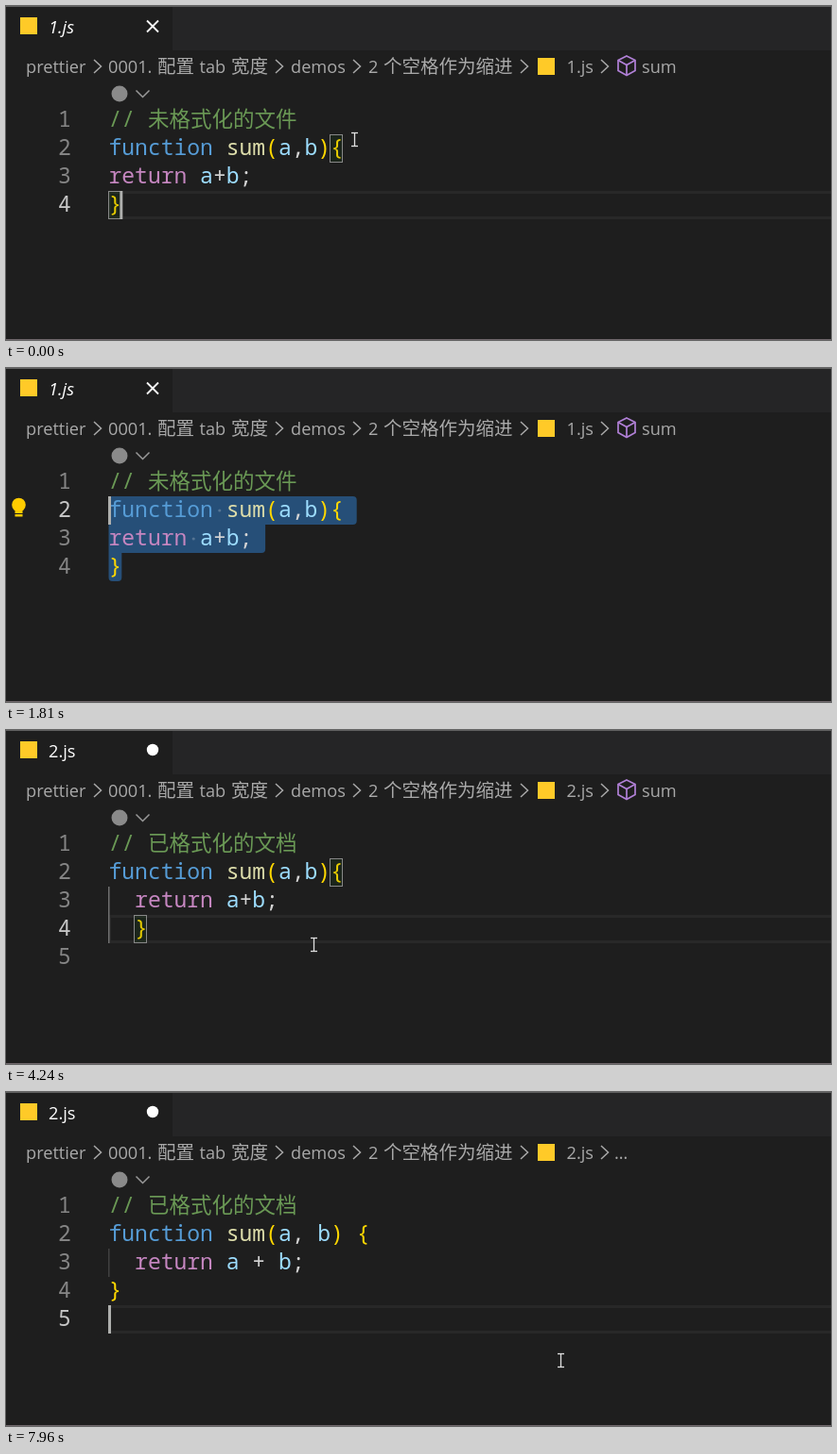
An HTML page with a canvas that plays this animation: 872x354 px, repeating every 8000 ms.

```html
<!DOCTYPE html>
<html lang="zh-CN">
<head>
<meta charset="utf-8">
<title>Tab width</title>
<style>
  html, body { margin: 0; width: 100%; height: 100%; overflow: hidden; background: #1e1e1e; }
  canvas { display: block; }
</style>
</head>
<body>
<canvas id="stage" width="872" height="354"></canvas>
<script>
const ctx = document.getElementById('stage').getContext('2d');
const LOOP = 8000, LEFT = 108.5, CHAR = 13.8, ROW = 30;
const CJK = '"Noto Sans CJK SC", "Noto Sans CJK"';
const CODE = `23px "Noto Sans Mono", ${CJK}, monospace`;
const UI = `18.2px "Open Sans", "Noto Sans", ${CJK}, sans-serif`;
const HAN = `19.5px ${CJK}, sans-serif`;

const note = '// 已格式化的文档', head = 'function sum(a,b){';
const messy = ['// 未格式化的文件', head, 'return a+b;', '}'];
const tidy = [note, 'function sum(a, b) {', '  return a + b;', '}', ''];
const pasted = [note, head, '  return a+b;', '  }', ''];
const outdented = [note, head, 'return a+b;', '}', ''];

// Each entry changes part of the editor state; at/from are [line, column].
const changes = [
  [0, { file: 1, lines: messy, at: [4, 1], from: null, caret: 1, crumb: 'sum' }],
  [685, { from: [4, 1], at: [3, 3] }],
  [825, { at: [2, 1] }],
  [970, { at: [2, 0] }],
  [1110, { bulb: [13.5, 147] }],
  [2055, { blur: true, caret: 0 }],
  [2315, { file: 2, lines: [], from: null, bulb: null, crumb: '' }],
  [2450, { lines: tidy, at: [1, 0], crumb: '…' }],
  [2880, { at: [4, 1], blur: false, caret: 1, crumb: 'sum' }],
  [3020, { from: [4, 1], at: [3, 5] }],
  [3160, { at: [2, 0] }],
  [3425, { bulb: [121, 177] }],
  [3695, { lines: pasted, from: null, at: [4, 3], bulb: null, dirty: true }],
  [4235, { caret: 0 }],
  [4795, { caret: 1 }],
  [4925, { from: [4, 3], at: [3, 9] }],
  [5060, { at: [3, 1] }],
  [5455, { bulb: [121, 207] }],
  [5735, { caret: 0.5 }],
  [5855, { caret: 0 }],
  [6135, { lines: outdented, from: [4, 1], at: [3, 0], bulb: null, caret: 1 }],
  [6565, { lines: tidy, at: [3, 2] }],
  [7050, { from: null, at: [5, 0], crumb: '…' }],
  [7375, { caret: 0 }],
  [7955, { caret: 1 }]
];

// Pointer path: time, x, y
const path = [
  [0, 368, 141], [120, 345, 148], [480, 124, 208], [600, 122, 208], [980, 110, 152],
  [1120, 110, 152], [1240, 698, 89], [1380, 835, 68], [1520, 900, 72], [2190, 900, 190],
  [2320, 630, 183], [2460, 430, 203], [2740, 126, 209], [2900, 122, 209], [3170, 112, 160],
  [3700, 113, 160], [4240, 325, 227], [4670, 152, 210], [4810, 150, 210], [5070, 122, 182],
  [5200, 122, 182], [5460, 595, 284], [6570, 595, 284], [6900, 586, 284], [LOOP, 586, 284]
];

// The screen refreshes in bursts: start, end, steps
const bursts = [
  [0, 0, 1], [120, 1120, 8], [1240, 2200, 8], [2320, 3310, 8], [3430, 4240, 7],
  [4540, 5460, 8], [5740, 5860, 2], [6140, 6140, 1], [6570, 7380, 6], [7960, 7960, 1]
];

function snap(t) {
  const [a, b, n] = bursts.filter(s => s[0] <= t).pop();
  if (n === 1) return a;
  const step = (b - a) / (n - 1);
  return a + step * Math.min(n - 1, Math.floor((t - a) / step + 0.01));
}

function pointer(t) {
  const i = Math.max(1, path.findIndex(p => p[0] >= t));
  const [t0, x0, y0] = path[i - 1], [t1, x1, y1] = path[i];
  const k = (t - t0) / (t1 - t0);
  return [x0 + (x1 - x0) * k, y0 + (y1 - y0) * k];
}

const colX = c => LEFT + c * CHAR;
const rowY = n => 106 + (n - 1) * ROW;

function rect(x, y, w, h, color) {
  ctx.fillStyle = color;
  ctx.fillRect(x, y, w, h);
}

function text(s, x, y, color, font) {
  ctx.font = font;
  ctx.fillStyle = color;
  ctx.fillText(s, x, y);
}

function line(points, color, width = 1.5) {
  ctx.beginPath();
  points.forEach(p => ctx.lineTo(...p));
  ctx.strokeStyle = color;
  ctx.lineWidth = width;
  ctx.stroke();
}

function dot(x, y, r, color) {
  ctx.beginPath();
  ctx.arc(x, y, r, 0, 7);
  ctx.fillStyle = color;
  ctx.fill();
}

const right = (x, y) => line([[x, y - 7], [x + 7.5, y], [x, y + 7]], '#a9a9a9');
const down = (x, y, color) => line([[x - 7, y - 3.5], [x, y + 3.5], [x + 7, y - 3.5]], color);

function chrome(s) {
  rect(0, 0, 872, 354, '#1e1e1e');
  rect(176, 0, 696, 47, '#252526');
  rect(0, 0, 872, 1, '#606060');
  rect(0, 353, 872, 1, '#6f666a');

  const name = s.file + '.js', grey = '#a9a9a9';
  rect(15, 12, 18, 18, '#ffca28');
  text(name, 45, 28.5, '#fff', (s.dirty ? '' : 'italic ') + UI);
  if (s.dirty) dot(155, 21, 6.2, '#fff');
  else {
    line([[149, 15.5], [161, 27.5]], '#fff', 1.8);
    line([[161, 15.5], [149, 27.5]], '#fff', 1.8);
  }

  [['prettier', 21], ['0001.', 108], ['tab', 204.5], ['demos', 301], ['2', 383], [name, 592.5]]
    .forEach(([word, x]) => text(word, x, 71, grey, UI));
  [['配置', 160], ['宽度', 238], ['个空格作为缩进', 399]]
    .forEach(([word, x]) => text(word, x, 71, grey, HAN));
  [93, 285, 367, 544].forEach(x => right(x, 64));
  rect(562, 55, 18, 18, '#ffca28');
  if (!s.crumb) return;
  right(629, 64);
  if (s.crumb === 'sum') {
    const purple = '#b180d7';
    line([[656, 53], [665, 57.5], [665, 68.5], [656, 73.5], [647, 68.5], [647, 57.5], [656, 53], [657, 53.5]], purple, 1.7);
    line([[647, 57.5], [656, 62.5], [665, 57.5]], purple, 1.7);
    line([[656, 62.5], [656, 73]], purple, 1.7);
    text('sum', 672, 71, grey, UI);
  } else text(s.crumb, 643, 71, grey, UI);
}

// Selected column range of every touched line
function selection(s) {
  if (!s.from) return [];
  const [[n0, c0], [n1, c1]] = [s.at, s.from];
  const rows = [];
  for (let n = n0; n <= n1; n++)
    rows.push({ n, a: n === n0 ? c0 : 0, b: n === n1 ? c1 : s.lines[n - 1].length + 1 });
  return rows;
}

function drawSelection(s) {
  const rows = selection(s);
  rows.forEach(({ n, a, b }, i) => {
    const up = rows[i - 1], next = rows[i + 1], r = on => on ? 4 : 0;
    ctx.beginPath();
    ctx.roundRect(colX(a), rowY(n), (b - a) * CHAR, ROW, [
      r(!up || up.a > a), r(!up || up.b < b), r(!next || next.b < b), r(!next || next.a > a)]);
    ctx.fillStyle = s.blur ? '#3a3d41' : '#264f78';
    ctx.fill();
    for (let c = a; c < b; c++)
      if (s.lines[n - 1][c] === ' ')
        dot(colX(c + 0.5), rowY(n) + 15, 1.6, 'rgba(227,228,226,.25)');
  });
}

function tokenColor(word) {
  if (word.startsWith('//')) return '#6a9955';
  if (/[(){}]/.test(word)) return '#ffd700';
  if (/^[ab]$/.test(word)) return '#9cdcfe';
  return { function: '#569cd6', return: '#c586c0', sum: '#dcdcaa' }[word] || '#d4d4d4';
}

function bracket(n, c) {
  ctx.strokeStyle = '#888';
  ctx.lineWidth = 1;
  ctx.fillStyle = 'rgba(0,100,0,.1)';
  ctx.fillRect(colX(c), rowY(n), 13, 29);
  ctx.strokeRect(Math.round(colX(c)) - 0.5, rowY(n) + 0.5, 13, 29);
}

function editor(s, fold) {
  if (!s.lines.length) return;
  const [row, col] = s.at, current = s.lines[row - 1];
  dot(120, 93, 8.5, '#8a8a8a');
  down(144.5, 93, '#999');

  if (!s.from && !s.blur) {
    ctx.strokeStyle = '#282828';
    ctx.lineWidth = 3;
    ctx.strokeRect(109.5, rowY(row) + 1.5, 780, 27);
  }
  drawSelection(s);
  s.lines.forEach((code, i) => {
    const n = i + 1, y = rowY(n);
    if (code[0] === ' ')
      rect(108, y, 1.5, ROW, current[0] === ' ' ? '#707070' : '#404040');
    text(n, 55, y + 22, n === row ? '#c6c6c6' : '#858585', CODE);
    if (n === 1) {
      text('//', LEFT, y + 22, '#6a9955', CODE);
      text(code.slice(3), colX(3), y + 22, '#6a9955', CODE.replace('23px', '22.5px'));
      return;
    }
    for (const m of code.matchAll(/\w+|\S/g))
      text(m[0], colX(m.index), y + 22, tokenColor(m[0]), CODE);
  });
  if (!s.from && current[col - 1] === '}') {
    bracket(2, s.lines[1].indexOf('{'));
    bracket(row, col - 1);
  }
  if (fold) down(91.5, 151.5, '#c5c5c5');
  if (s.caret) {
    ctx.globalAlpha = s.caret;
    rect(col ? colX(col) - 2 : 108, rowY(row), 3, ROW, '#aeafad');
    ctx.globalAlpha = 1;
  }
  if (s.bulb) {
    const [x, y] = s.bulb, yellow = '#ffcc00';
    dot(x, y - 2, 7.3, yellow);
    rect(x - 4, y + 2, 8, 5, yellow);
    rect(x - 4, y + 8, 8, 2.5, yellow);
  }
}

function drawPointer(x, y, arrow) {
  if (arrow) {
    ctx.beginPath();
    [[0, 0], [0, 16], [4, 12.5], [6.5, 18.5], [9, 17.5], [6.5, 11.5], [11, 11.5]]
      .forEach(([dx, dy]) => ctx.lineTo(x + dx, y + dy));
    ctx.closePath();
    ctx.fillStyle = '#fff';
    ctx.fill();
    ctx.strokeStyle = '#000';
    ctx.lineWidth = 1;
    ctx.stroke();
    return;
  }
  x = Math.round(x) + 0.5;
  y = Math.round(y) + 0.5;
  line([[x, y - 7], [x, y + 7]], '#e0e0e0', 1.3);
  for (const dy of [-7, 7]) line([[x - 3.5, y + dy], [x + 3.5, y + dy]], '#e0e0e0', 1.3);
}

function draw(now) {
  const t = snap(now % LOOP);
  const s = Object.assign({}, ...changes.filter(c => c[0] <= t).map(c => c[1]));
  const [x, y] = pointer(t);
  chrome(s);
  editor(s, x < 118);
  drawPointer(x, y, !s.lines.length);
}

let start;
function tick(now) {
  start ??= now;
  draw(now - start);
  requestAnimationFrame(tick);
}
draw(0);
requestAnimationFrame(tick);
</script>
</body>
</html>
```
